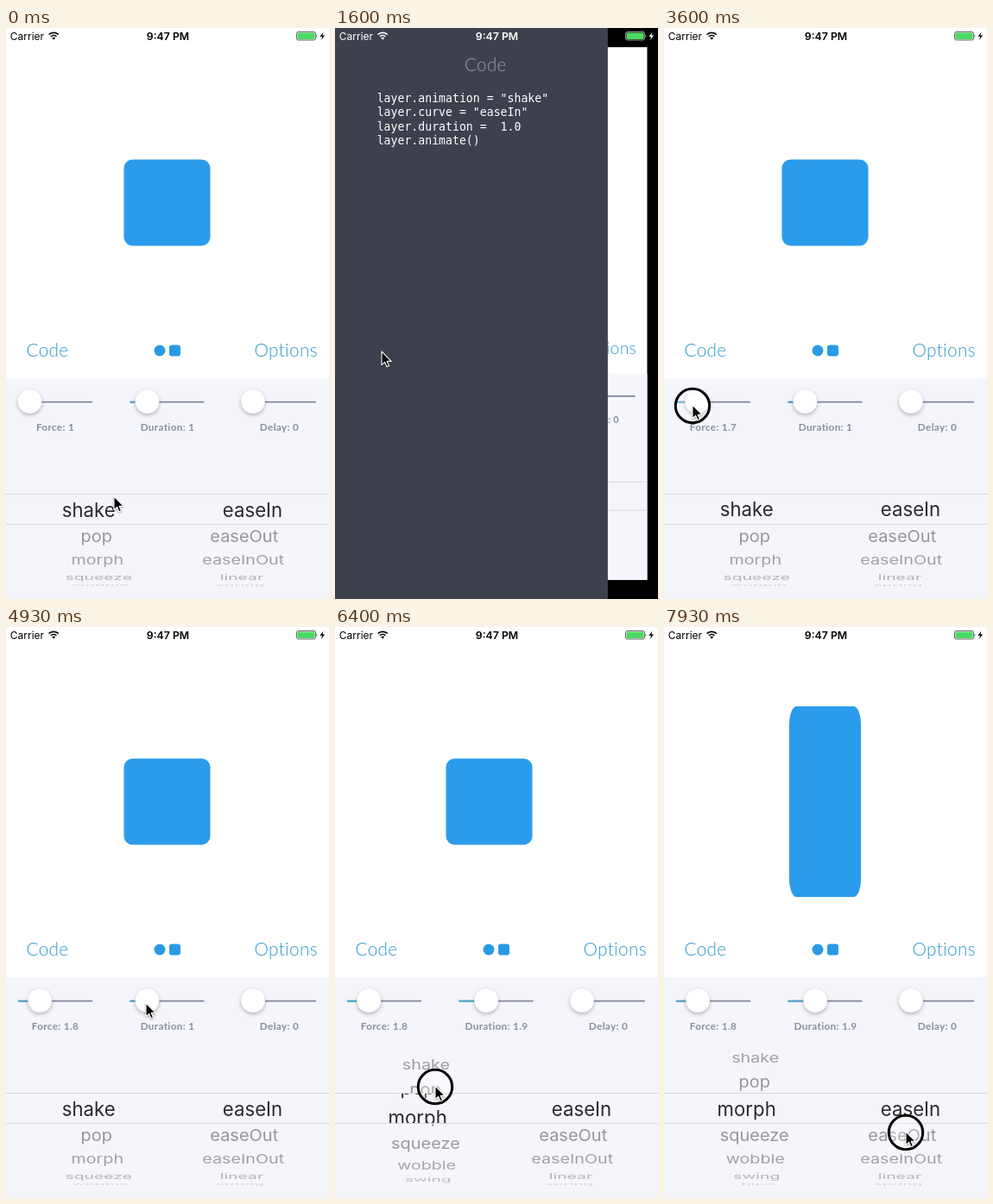
Animation, 374 px wide and 662 px high, one loop 8 s. Source, as an HTML page:

```html
<!DOCTYPE html>
<html lang="en">
<head>
<meta charset="utf-8">
<title>Animation playground</title>
<style>
  html, body { margin: 0; width: 100%; height: 100%; overflow: hidden; background: #000; }
  svg { display: block; width: 374px; height: 662px; }
  text { white-space: pre; }
  .status { font: 12px Inter, sans-serif; }
  .link { font: 300 20.8px Lato, sans-serif; letter-spacing: .3px; fill: #2f9acb; }
  .label { font: 700 11.8px Lato, sans-serif; letter-spacing: .3px; fill: #8b8d9f; text-anchor: middle; }
  .row { font: 22.2px Inter, sans-serif; text-anchor: middle; }
  .code { font: 13.2px "DejaVu Sans Mono", monospace; fill: #fff; }
  .knob { fill: #fff; stroke: rgba(0,0,0,.07); stroke-width: .6; filter: drop-shadow(0 2px 2px rgba(0,0,0,.25)); }
  .arrow { filter: drop-shadow(0 1px 1px rgba(0,0,0,.35)); }
</style>
</head>
<body>
<svg id="stage" viewBox="0 0 374 662">
  <defs>
    <clipPath id="lens"><rect y="541" width="374" height="34"/></clipPath>
    <clipPath id="wheel"><path d="M0 470H374V540H0ZM0 576H374V648H0Z"/></clipPath>
  </defs>
  <rect width="374" height="662"/>
  <g id="main">
    <rect width="374" height="662" fill="#fff"/>
    <rect id="box" x="-50" y="-50" width="100" height="100" rx="10" fill="#2b9ceb"/>
    <text class="link" x="23.5" y="381">Code</text>
    <text class="link" x="360.8" y="381" text-anchor="end">Options</text>
    <circle cx="178" cy="374" r="6.5" fill="#2b9ae4"/>
    <rect x="189" y="367.5" width="13" height="13" rx="3" fill="#2b9ae4"/>
    <rect y="406" width="374" height="256" fill="#f5f6fb"/>
    <g id="sliders"></g>
    <g id="rows" clip-path="url(#wheel)"></g>
    <path d="M0 540.5H374M0 575.5H374" stroke="#d5d6db"/>
    <g id="lensRows" clip-path="url(#lens)" fill="#2a2a2e"></g>
  </g>
  <g id="panel">
    <rect x="-30" width="336" height="662" fill="#3d414d"/>
    <text x="164.5" y="49.5" text-anchor="middle" font-family="Lato, sans-serif" font-weight="300" font-size="20.6" letter-spacing=".3" fill="#9a9ea8">Code</text>
    <text class="code" x="38.8" y="86">layer.animation = "shake"</text>
    <text class="code" x="38.8" y="102.4">layer.curve = "easeIn"</text>
    <text class="code" x="38.8" y="118.7">layer.duration =  1.0</text>
    <text class="code" x="38.8" y="135">layer.animate()</text>
  </g>
  <g id="status" class="status" fill="currentColor">
    <text x="4.8" y="13.5">Carrier</text>
    <g fill="none" stroke="currentColor" stroke-width="1.7">
      <path d="M49.6 7.6A8 8 0 0 1 60.8 7.6M51.9 10A4.8 4.8 0 0 1 58.5 10"/>
    </g>
    <path d="M55.2 13.7L53.2 11.6A2.9 2.9 0 0 1 57.2 11.6Z"/>
    <text x="187.5" y="13.5" text-anchor="middle" font-weight="600" font-size="12.3">9:47 PM</text>
    <rect x="336.5" y="4.5" width="22" height="9.5" rx="2" fill="none" stroke="currentColor" stroke-opacity=".6"/>
    <rect x="337.5" y="5.5" width="20" height="7.5" rx="1" fill="#4cd964"/>
    <path d="M359.6 7.4q1.6 1.8 0 3.6z"/>
    <path d="M367.4 4.8L363.4 9.9H366L365 14L369 8.6H366.4Z"/>
  </g>
  <g id="cursor">
    <circle id="ring" cy="1" r="19.7" fill="#fff" fill-opacity=".25" stroke="#000" stroke-width="3"/>
    <path class="arrow" d="M0 0V15.6L3.6 12.3L6 17.8L8.6 16.7L6.2 11.4H11.2Z" stroke="#fff" stroke-width="1.1" stroke-linejoin="round"/>
  </g>
</svg>
<script>
const LOOP = 8000;
const $ = id => document.getElementById(id);

function add(parent, tag, attrs, text = '') {
  const el = document.createElementNS('http://www.w3.org/2000/svg', tag);
  for (const key in attrs) el.setAttribute(key, attrs[key]);
  el.textContent = text;
  parent.append(el);
  return el;
}

const clamp = x => Math.min(1, Math.max(0, x));
const mix = (a, b, p) => a + (b - a) * p;
const smooth = p => p * p * (3 - 2 * p);
const easeOut = p => 1 - (1 - p) ** 2;
const span = (t, from, to) => clamp((t - from) / (to - from));

// Time, x, y of the pointer tip
const PATH = [
  [0, 125, 543], [900, 53, 376], [1600, 54, 375],
  [2250, 300, 333], [2530, 300, 333], [3300, 29, 437], [3350, 29, 437],
  [3600, 33, 437], [3920, 34, 437], [4700, 162, 436], [5040, 162, 436],
  [5452, 173, 437], [5580, 173, 437], [5920, 116, 590], [6010, 116, 590],
  [6400, 116, 532], [6470, 116, 527], [6900, 118, 527], [7600, 282, 606],
  [7810, 280, 585], [8000, 280, 585]
];
const PRESSES = [[1000, 1240], [2270, 2400], [3330, 3900], [5000, 5520], [5950, 6470], [7850, 8000]];

function pointAt(t) {
  const i = Math.max(1, PATH.findIndex(k => k[0] > t));
  const [t0, x0, y0] = PATH[i - 1], [t1, x1, y1] = PATH[i];
  const p = smooth(span(t, t0, t1));
  return [mix(x0, x1, p), mix(y0, y1, p)];
}

// Spring from 0 to 1 with a damping ratio of 0.7, settled after 700 ms
function spring(ms) {
  if (ms <= 0) return 0;
  const s = ms / 1000, decay = 10.3, freq = 10.5;
  return 1 - Math.exp(-decay * s) * (Math.cos(freq * s) + decay / freq * Math.sin(freq * s));
}

// cubic-bezier(.42, 0, 1, 1)
function easeIn(x) {
  let lo = 0, hi = 1;
  for (let i = 0; i < 24; i++) {
    const s = (lo + hi) / 2;
    if (1.26 * (1 - s) ** 2 * s + smooth(s) < x) lo = s; else hi = s;
  }
  return smooth(lo);
}

// Values spaced a fifth of the duration apart, the whole run eased in
function keyed(values, p) {
  if (p <= 0 || p >= 1) return values[values.length - 1];
  const k = easeIn(p) * 5, i = Math.floor(k);
  return i >= values.length - 1 ? values[values.length - 1] : mix(values[i], values[i + 1], k - i);
}

// Dragging a slider restarts the shake every 50 ms until the drag ends
function shakeAt(t, from, to, force, duration) {
  if (t < from) return 0;
  const start = t < to ? to - 50 * Math.ceil((to - t) / 50) : to;
  const d = 30 * force;
  return keyed([0, d, -d, d, 0], (t - start) / duration);
}

const sliders = [
  { name: 'Force', left: 14, right: 100, center: 57, min: 1, max: 5 },
  { name: 'Duration', left: 143.5, right: 229.5, center: 187, min: .5, max: 5 },
  { name: 'Delay', left: 272.5, right: 359, center: 316.5, min: 0, max: 5 }
].map(s => {
  const line = (color, x2) => add($('sliders'), 'line',
    { x1: s.left, x2, y1: 433.7, y2: 433.7, stroke: color, 'stroke-width': 1.8 });
  line('#83859c', s.right);
  return {
    ...s,
    fill: line('#3fa5cb', s.left),
    knob: add($('sliders'), 'circle', { class: 'knob', cy: 433, r: 14 }),
    label: add($('sliders'), 'text', { class: 'label', x: s.center, y: 467 })
  };
});

function setSlider(s, value) {
  const x = mix(s.left + 13.5, s.right - 14, (value - s.min) / (s.max - s.min));
  s.fill.setAttribute('x2', x);
  s.knob.setAttribute('cx', x);
  s.label.textContent = `${s.name}: ${+value.toFixed(1)}`;
}

const makeColumn = (x, names) => names.map(name => ({
  flat: add($('lensRows'), 'text', { class: 'row', x: 187 + x }, name),
  round: add($('rows'), 'text', { class: 'row', x, y: 8 }, name)
}));
const kinds = makeColumn(-91.3, ['shake', 'pop', 'morph', 'squeeze', 'wobble', 'swing', 'flipX', 'flipY']);
const curves = makeColumn(98.5, ['easeIn', 'easeOut', 'easeInOut', 'linear', 'spring']);

function setColumn(column, scroll) {
  column.forEach(({ flat, round }, i) => {
    const offset = i - scroll, angle = offset * 20.6 * Math.PI / 180;
    const shown = Math.abs(angle) < 1.5, cos = Math.max(.01, Math.cos(angle));
    const scale = .845 + .06 * cos;
    flat.setAttribute('y', 566.5 + offset * 34.5);
    round.setAttribute('visibility', shown ? 'visible' : 'hidden');
    round.setAttribute('fill-opacity', .4 * Math.sqrt(cos));
    round.setAttribute('transform',
      `translate(187 ${558.3 + 89 * Math.sin(angle)}) scale(${scale} ${scale * cos})`);
  });
}

function draw(t) {
  const force = mix(1, 1.8, easeOut(span(t, 3350, 3700)));
  const duration = mix(1, 1.9, easeOut(span(t, 5040, 5452)));
  [force, duration, 0].forEach((v, i) => setSlider(sliders[i], v));

  const drag = 1.7 * smooth(span(t, 6010, 6400));
  const settle = .3 * easeOut(span(t, 6400, 6780));
  setColumn(kinds, drag + settle);
  setColumn(curves, 0);

  const shift = t < 5040 ? shakeAt(t, 3350, 3700, force, 1000) : shakeAt(t, 5040, 5452, 1.8, 1900);
  const morph = (t - 6864) / 1900, big = 1.3 * 1.8;
  const sx = keyed([1, big, .7, big, 1], morph);
  const sy = keyed([1, .7, big, .7, 1], morph);
  $('box').setAttribute('transform', `translate(${186.5 + shift} 202.5) scale(${sx} ${sy})`);

  const open = spring(t - 1235) - spring(t - 2380);
  const zoom = 1 - .065 * open;
  $('main').setAttribute('transform', `translate(187 331) scale(${zoom}) translate(-187 -331)`);
  $('panel').setAttribute('transform', `translate(${-306 * (1 - open)})`);
  $('panel').setAttribute('visibility', open > .002 ? 'visible' : 'hidden');

  const light = span(t, 1330, 1580) - span(t, 2500, 2750);
  const tone = Math.round(255 * light);
  $('status').style.color = `rgb(${tone},${tone},${tone})`;

  $('cursor').setAttribute('transform', `translate(${pointAt(t)})`);
  $('ring').setAttribute('visibility', PRESSES.some(([a, b]) => t >= a && t < b) ? 'visible' : 'hidden');
}

const begin = performance.now();
function tick() {
  draw((performance.now() - begin) % LOOP);
  requestAnimationFrame(tick);
}
tick();
</script>
</body>
</html>
```
